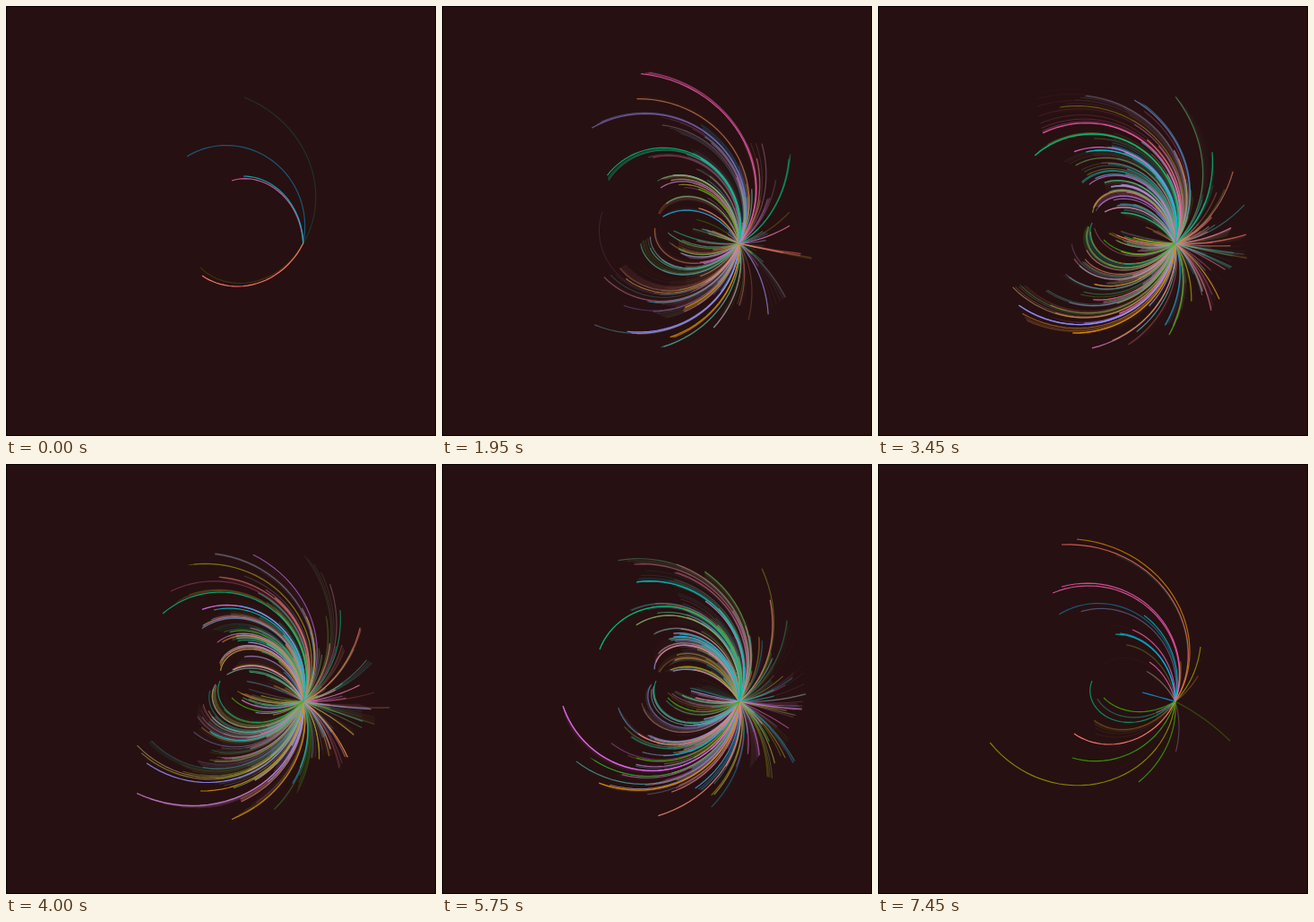
An HTML page with a canvas for the animation above (7500 ms loop, 480 px wide and 480 px high).

```html
<!DOCTYPE html>
<html lang="en">
<head>
<meta charset="utf-8">
<title>Spiral strands</title>
<style>
  html, body { margin: 0; width: 100%; height: 100%; overflow: hidden; background: #271011; }
  canvas { display: block; width: 480px; height: 480px; }
</style>
</head>
<body>
<canvas id="stage" width="480" height="480"></canvas>
<script>
const ctx = document.getElementById('stage').getContext('2d');
const STEP = 50, STEPS = 150, LOOP = 7.5;
const WAKE = 9, MOVE = 0.65, BEAT = 1.125;
const CENTER = 240, DEG = Math.PI / 180;
const CUT = -155.3; // the angle where the polar plane is split
const [SALMON, ORANGE, OLIVE, GREEN, JADE, CYAN, BLUE, LILAC, VIOLET, PINK] =
  ['F8766D', 'D89000', 'A3A500', '39B600', '00BF7D',
   '00BFC4', '00B0F6', '9590FF', 'E76BF3', 'FF62BC']
  .map(h => [0, 2, 4].map(i => parseInt(h.slice(i, i + 2), 16)));
const HUES = [SALMON, ORANGE, OLIVE, GREEN, JADE, CYAN, BLUE, LILAC, VIOLET, PINK];
const SAND = [205, 165, 150];

const mix = (a, b, k) => a + (b - a) * k;
const blend = (a, b, k) => a.map((v, i) => mix(v, b[i], k));
const clamp = (v, lo, hi) => Math.max(lo, Math.min(hi, v));
const ease = k => k < 0.5 ? 4 * k ** 3 : 1 - (2 - 2 * k) ** 3 / 2;

let seed = 41;
function rnd() {
  seed = seed + 0x6D2B79F5 | 0;
  let v = Math.imul(seed ^ seed >>> 15, 1 | seed);
  v = v + Math.imul(v ^ v >>> 7, 61 | v) ^ v;
  return ((v ^ v >>> 14) >>> 0) / 4294967296;
}
const between = (lo, hi) => mix(lo, hi, rnd());
const bell = spread => (rnd() + rnd() + rnd() - 1.5) * 2 * spread;
const anyHue = () => HUES[Math.floor(rnd() * HUES.length)];
const softHue = () => blend(blend(anyHue(), anyHue(), 0.5 * rnd() ** 2), SAND, 0.45 * rnd());

function polar(x, y) {
  const dx = x - CENTER, dy = y - CENTER;
  let a = Math.atan2(dy, dx) / DEG;
  if (a < CUT) a += 360;
  return { a, r: Math.hypot(dx, dy) };
}
const hub = polar(331.7, 265);

// A track is a tip that rests at stops {t, a, r, c} and glides between them.
const tracks = [];
const addTrack = (from, to, alpha, stops) => tracks.push({ from, to, alpha, stops });

// Crowd: tips scattered around the hub, each wandering near its home
function addCrowd(count, lingering) {
  for (let i = 0; i < count; i++) {
    const late = i < lingering;
    const from = 0.1 + 3.3 * rnd();
    const to = late ? LOOP : 5.65 + 1.5 * rnd();
    const a = clamp(hub.a + bell(62), -100, 125);
    const nearHub = Math.exp(-(((a - hub.a) / 35) ** 2));
    const r = clamp(82 + 30 * nearHub + bell(36), 14, 165);
    const stops = [];
    for (let t = from; t < to + 1; t += between(0.7, 1.3)) {
      stops.push({ t, a: a + bell(11), r: Math.max(8, r + bell(11)), c: softHue() });
    }
    addTrack(from, to, late ? 0.35 : 0.25 + 0.6 * rnd() ** 1.5, stops);
  }
}

// Leading strand: reaches one tip per beat, the first one at time t
function strand(c, alpha, t, ...tips) {
  const stops = tips.map(([x, y], i) => ({ t: t + i * BEAT, ...polar(x, y), c }));
  const first = stops[0], from = t - MOVE;
  stops.unshift({ t: from, a: mix(first.a, hub.a, 0.16), r: first.r + 5, c });
  addTrack(from, t + (tips.length - 1) * BEAT + 0.45, alpha, stops);
}

// Resting strand; a start later than the end runs across the loop seam
function rest(c, alpha, from, to, x, y) {
  addTrack(from, to, alpha, [{ t: from, ...polar(x, y), c }]);
}

addCrowd(190, 10);

strand(JADE, 0.85, 1.25, [186, 195], [184, 157], [175, 167], [181, 195], [176, 207]);
strand(VIOLET, 0.9, 1.25, [179, 230]);
strand(LILAC, 0.5, 1.25, [178, 129], [127, 186]);
strand(JADE, 0.6, 1.25, [389, 165], [375, 198], [373, 163], [360, 122]);
strand(SALMON, 0.5, 1.25, [400, 279], [403, 263], [411, 255]);
strand(PINK, 0.75, 2.375, [176, 92], [184, 142]);
strand(LILAC, 0.85, 2.375, [180, 348], [157, 334], [147, 298]);
strand(ORANGE, 0.85, 2.375, [231, 366], [217, 365], [195, 365], [175, 356]);
strand(CYAN, 0.85, 3.5, [232, 163], [245, 101], [217, 132]);
strand(VIOLET, 0.85, 5.75, [135, 270]);

rest(JADE, 0.2, 7, 0.3, 266, 102);
rest(BLUE, 0.45, 7.1, 0.3, 202, 168);
rest(PINK, 0.8, 0, 0.3, 252, 195);
rest(CYAN, 0.85, 5.6, 1.4, 265, 190);
rest(SALMON, 1, 4.2, 0.4, 219, 301);
rest(OLIVE, 0.2, 0, 0.3, 217, 292);
rest(JADE, 0.7, 3.2, LOOP, 239, 242);
rest(GREEN, 0.8, 2.4, LOOP, 252, 261);
rest(GREEN, 0.8, 5.4, LOOP, 217, 328);

// Closing set, joining one by one
[
  [ORANGE, 222, 84], [SALMON, 205, 90], [PINK, 205, 137], [PINK, 195, 144],
  [CYAN, 297, 169], [PINK, 284, 185], [BLUE, 270, 189], [PINK, 303, 221],
  [BLUE, 295, 255], [OLIVE, 125, 311], [GREEN, 291, 355], [OLIVE, 360, 204]
].forEach(([c, x, y], i) => rest(c, 0.75, 6.4 + i * 0.07, LOOP, x, y));

const alive = ({ from, to }, t) => from <= to
  ? t >= from && t <= to
  : t >= from || t <= to;

function tipAt({ stops }, t) {
  let i = stops.length - 1;
  while (i > 0 && stops[i].t > t) i--;
  const p = stops[i], q = stops[i + 1];
  if (!q || t <= p.t) return p;
  const span = Math.min(MOVE, q.t - p.t);
  const k = ease(Math.max(0, (t - q.t + span) / span));
  return { a: mix(p.a, q.a, k), r: mix(p.r, q.r, k), c: blend(p.c, q.c, k) };
}

// Angle and radius both change evenly from the hub to the tip.
function spiral(tip, alpha, width) {
  const n = 6 + Math.ceil(Math.abs(tip.a - hub.a) / 5);
  ctx.beginPath();
  for (let i = 0; i <= n; i++) {
    const a = mix(hub.a, tip.a, i / n) * DEG, r = mix(hub.r, tip.r, i / n);
    ctx.lineTo(CENTER + r * Math.cos(a), CENTER + r * Math.sin(a));
  }
  ctx.strokeStyle = `rgba(${tip.c.map(Math.round)},${alpha})`;
  ctx.lineWidth = width;
  ctx.stroke();
}

function drawTrack(track, step) {
  let next = null;
  const trail = [];
  for (let j = 0; j < WAKE && j <= step; j++) {
    const t = (step - j) * STEP / 1000;
    if (!alive(track, t)) continue;
    const tip = tipAt(track, t);
    const moved = !next || Math.abs(tip.a - next.a) + Math.abs(tip.r - next.r) > 0.05;
    if (moved) trail.push([tip, j]);
    next = tip;
  }
  for (const [tip, j] of trail.reverse()) {
    const fade = 1 - j / WAKE;
    spiral(tip, track.alpha * (j ? 0.5 * fade : 1), 0.5 + 0.7 * fade);
  }
}

function draw(step) {
  ctx.fillStyle = '#271011';
  ctx.fillRect(0, 0, 480, 480);
  ctx.lineJoin = 'round';
  for (const track of tracks) drawTrack(track, step);
  ctx.strokeStyle = 'rgba(0, 0, 0, 0.75)';
  ctx.lineWidth = 1;
  ctx.strokeRect(0.5, 0.5, 479, 479);
}

const start = performance.now();
let shown = -1;
function tick() {
  const step = Math.floor((performance.now() - start) / STEP) % STEPS;
  if (step !== shown) draw(shown = step);
  requestAnimationFrame(tick);
}
tick();
</script>
</body>
</html>
```
